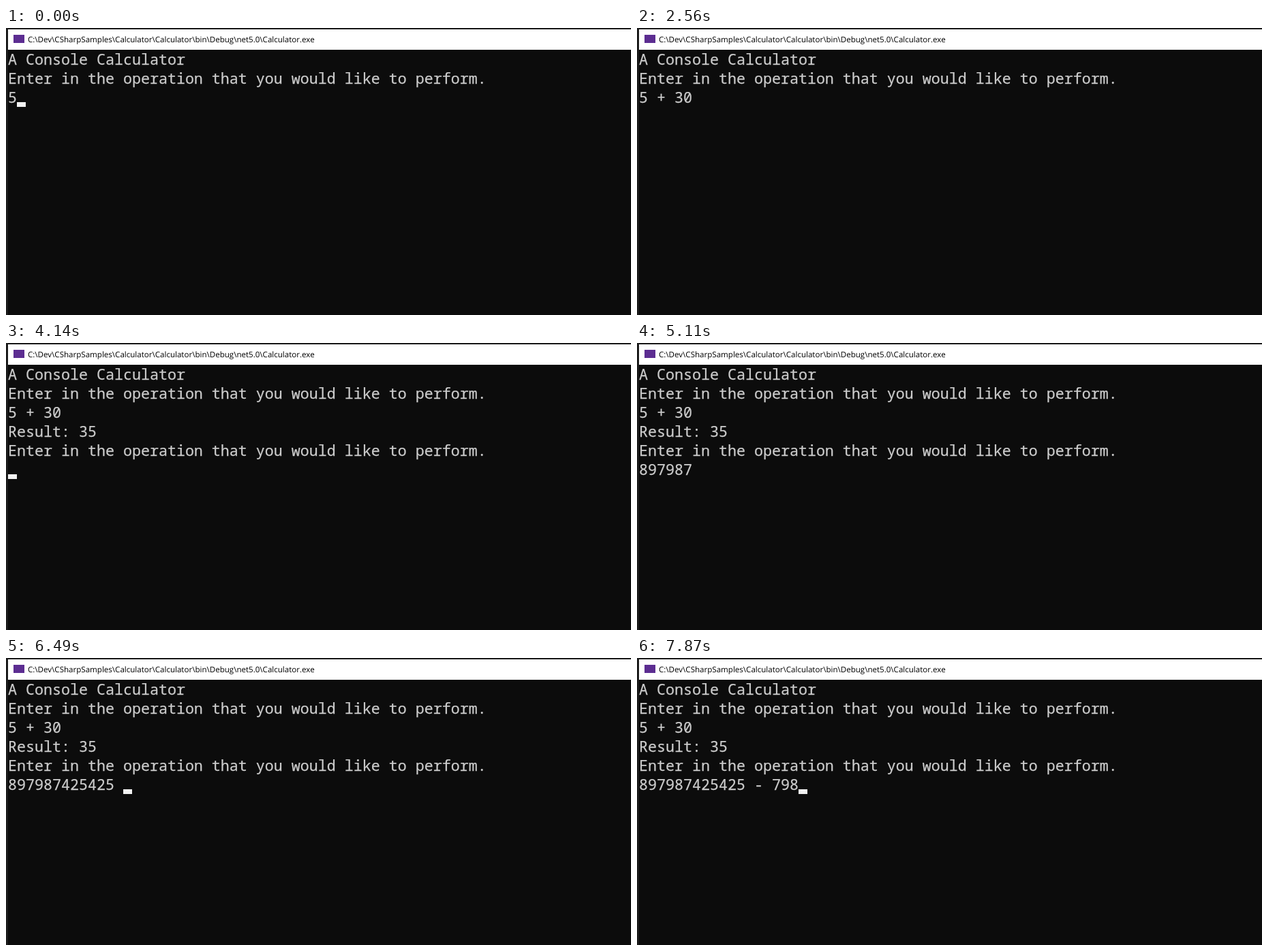
Recreate the animation shown at these times as an HTML page. Size 917 by 422 pixels, loop 8 s.

```html
<!DOCTYPE html>
<html lang="en">
<head>
<meta charset="utf-8">
<title>Console Calculator</title>
<style>
  html, body { margin: 0; width: 100%; height: 100%; overflow: hidden; background: #1c1c1c; }
  svg { display: block; }
  text { white-space: pre; }
  .title { font: 11.57px "Open Sans", "Noto Sans", sans-serif; fill: #000; text-rendering: geometricPrecision; }
  .line { font: 21.667px "Noto Sans Mono", "DejaVu Sans Mono", monospace; fill: #ccc; stroke: #ccc; stroke-width: .25px; }
</style>
</head>
<body>
<svg width="917" height="422" viewBox="0 0 917 422">
  <rect width="917" height="422" fill="#1c1c1c"/>
  <rect x="3" y="2" width="914" height="30" fill="#fff"/>
  <rect x="3" y="32" width="914" height="390" fill="#0c0c0c"/>
  <rect x="11" y="10" width="16" height="12" fill="#5c2d91"/>
  <text class="title" x="32" y="21">C:\Dev\CSharpSamples\Calculator\Calculator\bin\Debug\net5.0\Calculator.exe</text>
  <g id="screen"></g>
  <rect id="caret" width="13" height="7" fill="#f2f2f2"/>
</svg>
<script>
  const LOOP = 8000, CELL_W = 13, CELL_H = 28, LEFT = 3, TOP = 32;
  const PROMPT = "Enter in the operation that you would like to perform.\n";
  const INTRO = "A Console Calculator\n" + PROMPT + "5";
  const REPLY = "\nResult: 35\n" + PROMPT;

  // Output arrives in bursts, its chunks spread evenly from start to end.
  const BURSTS = [
    { start: 430, end: 430, chunks: [" "] },
    { start: 860, end: 990, chunks: ["+", " "] },
    { start: 1980, end: 2130, chunks: ["3", "0"] },
    { start: 3020, end: 3020, chunks: [REPLY] },
    { start: 4720, end: 4990, chunks: ["897", "98", "7"] },
    { start: 5290, end: 5680, chunks: ["42", "54", "2", "5"] },
    { start: 6490, end: 6740, chunks: [" ", "-", " "] },
    { start: 7750, end: 7870, chunks: ["79", "8"] }
  ];

  // The caret starts lit and flips at each of these times.
  const BLINKS = [1570, 2130, 2560, 3020, 3580, 4140, 5110, 5290, 5680, 6210, 7290, 7750];

  const screen = document.getElementById("screen");
  const caret = document.getElementById("caret");
  const rows = Array.from({ length: 6 }, (_, i) => {
    const row = document.createElementNS("http://www.w3.org/2000/svg", "text");
    row.setAttribute("class", "line");
    row.setAttribute("x", LEFT);
    row.setAttribute("y", TOP + i * CELL_H + 22);
    return screen.appendChild(row);
  });

  function outputAt(t) {
    let text = INTRO;
    for (const { start, end, chunks } of BURSTS) {
      const gap = (end - start) / Math.max(1, chunks.length - 1);
      text += chunks.filter((_, i) => t >= start + i * gap).join("");
    }
    return text;
  }

  function draw(t) {
    const lines = outputAt(t).split("\n");
    const last = lines.length - 1;
    const lit = BLINKS.filter(b => b <= t).length % 2 === 0;
    rows.forEach((row, i) => { row.textContent = lines[i] || ""; });
    caret.setAttribute("x", LEFT + lines[last].length * CELL_W);
    caret.setAttribute("y", TOP + (last + 1) * CELL_H - 7);
    caret.setAttribute("visibility", lit ? "visible" : "hidden");
  }

  const begin = performance.now();
  function tick() {
    draw((performance.now() - begin) % LOOP);
    requestAnimationFrame(tick);
  }
  tick();
</script>
</body>
</html>
```
